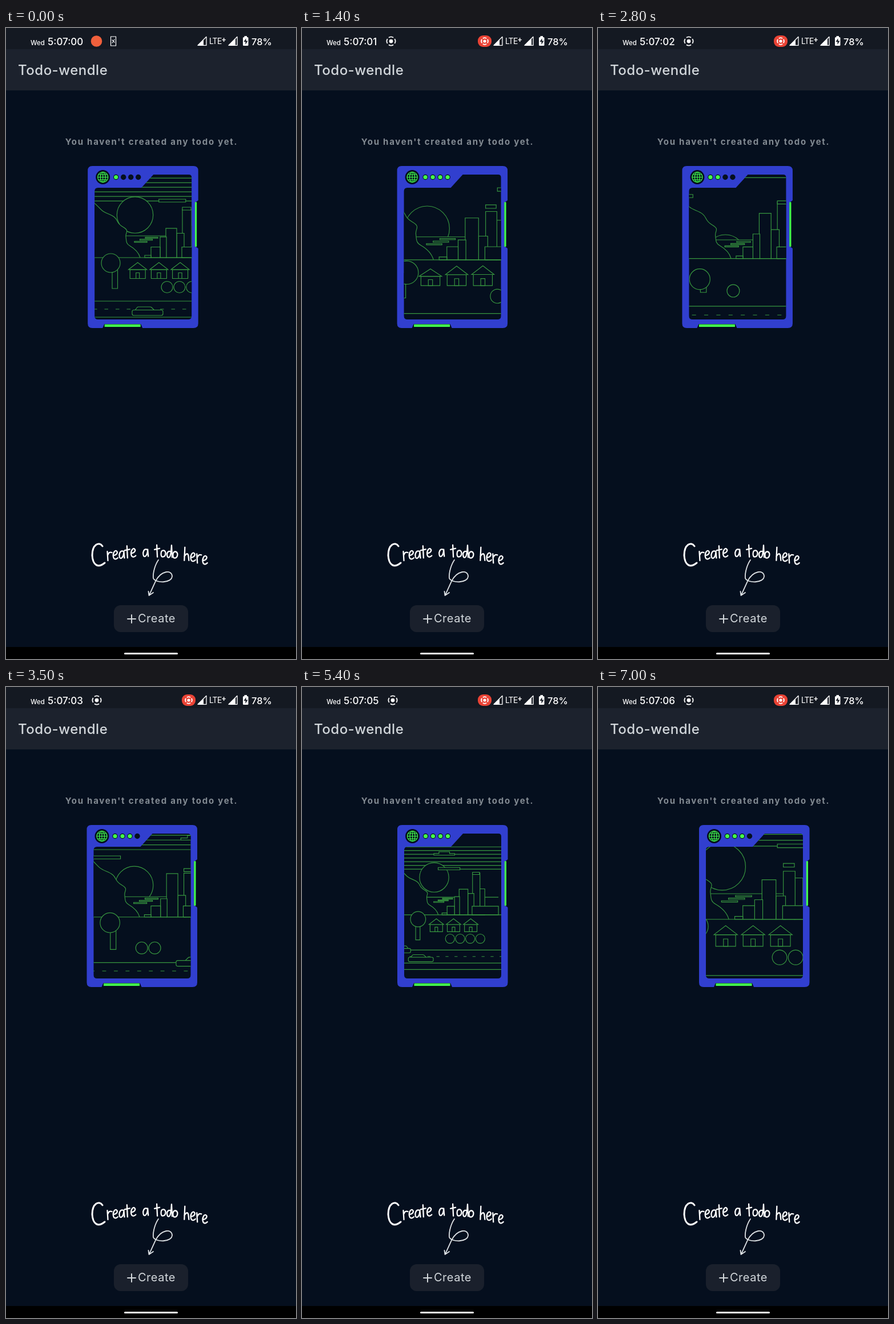
Animation of 508x1102 px, one loop 7100 ms. Source, as an HTML page with a canvas:

```html
<!DOCTYPE html>
<html lang="en">
<head>
<meta charset="utf-8">
<title>Todo list, empty state</title>
<style>
html, body { margin: 0; width: 100%; height: 100%; overflow: hidden; background: #050f1e; }
canvas { display: block; width: 100%; height: 100%; }
</style>
</head>
<body>
<canvas id="stage" width="508" height="1102" aria-label="Create a todo here"></canvas>
<script>
const ctx = document.getElementById('stage').getContext('2d');
const LOOP = 7100, CYCLE = 6200;
const NIGHT = '#050f1e', BLUE = '#313fcf', LIME = '#43fb4d', LINE = '#37963f';

const clamp = v => Math.max(0, Math.min(1, v));
const smooth = v => { v = clamp(v); return v * v * (3 - 2 * v); };
// Cosine that peaks at the given time and swings a whole number of times per cycle.
const wave = (p, swings, peak) => Math.cos(2 * Math.PI * swings * (p - peak) / CYCLE);
// Rises at one time and falls again at another.
const pulse = (q, rise, fall, length) => smooth((q - rise) / length) - smooth((q - fall) / length);

// Monotone cubic through [time, value] points that ends on its first value.
function path(p, ...points) {
  const pts = [...points, [CYCLE, points[0][1]]];
  const slope = k => (pts[k + 1][1] - pts[k][1]) / (pts[k + 1][0] - pts[k][0]);
  const tangent = k => {
    if (k === 0 || k === pts.length - 1) return 0;
    const a = slope(k - 1), b = slope(k);
    return a * b <= 0 ? 0 : 2 * a * b / (a + b);
  };
  let i = 0;
  while (p >= pts[i + 1][0]) i++;
  const [[t0, v0], [t1, v1]] = [pts[i], pts[i + 1]];
  const u = (p - t0) / (t1 - t0);
  return v0 + (v1 - v0) * smooth(u)
    + (t1 - t0) * u * (1 - u) * ((1 - u) * tangent(i) - u * tangent(i + 1));
}

function rect(x, y, w, h, color, r = 0) {
  ctx.fillStyle = color;
  ctx.beginPath();
  ctx.roundRect(x, y, w, h, r);
  ctx.fill();
}
function disc(x, y, r, color) {
  ctx.fillStyle = color;
  ctx.beginPath();
  ctx.arc(x, y, r, 0, 7);
  ctx.fill();
}
function label(str, x, y, font, color, align = 'left', spacing = 0) {
  ctx.font = font + ', sans-serif';
  ctx.fillStyle = color;
  ctx.textAlign = align;
  ctx.letterSpacing = spacing + 'px';
  ctx.fillText(str, x, y);
}
function stroke(d, color, width, x = 0, y = 0) {
  ctx.save();
  ctx.translate(x, y);
  ctx.strokeStyle = color;
  ctx.lineWidth = width;
  ctx.lineCap = ctx.lineJoin = 'round';
  ctx.stroke(new Path2D(d));
  ctx.restore();
}
function fill(d, color) {
  ctx.fillStyle = color;
  ctx.fill(new Path2D(d));
}

function targetIcon(x, y, r) {
  disc(x, y, r * .45, '#fff');
  ctx.strokeStyle = '#fff';
  ctx.lineWidth = 1.8;
  for (let i = 0; i < 4; i++) {
    const a = i * Math.PI / 2;
    ctx.beginPath();
    ctx.arc(x, y, r, a - .58, a + .58);
    ctx.stroke();
  }
}

function statusBar(t) {
  rect(0, 0, 508, 37, '#141922');
  const second = Math.max(0, Math.floor((t - 300) / 1000));
  label('Wed', 43, 30, '500 11.5px Inter', '#fff');
  label('5:07:0' + second, 73, 30, '500 17px Inter', '#fff');
  if (t < 400) {
    disc(158.5, 23, 9.8, '#f0603c');
    stroke('M183.5 15h9v16h-9zM186 21l4 4M190 20l-4 6', '#fff', 1.2);
  } else {
    targetIcon(second === 1 ? 156 : 159, 23, 7.5);
    rect(308, 13, 24, 20, '#ea4335', 9);
    targetIcon(320, 23, 5.8);
  }
  for (const [x, level] of [[336, 10], [390, 12]]) {
    stroke(`M${x} 30.3h15v-15z`, '#fff', 1.3);
    fill(`M${x} 30h${level}v-${level}z`, '#fff');
  }
  label('LTE', 356, 28, '14px Roboto', '#fff');
  label('+', 378, 25, '500 13px Roboto', '#fff');
  rect(415, 16, 9.5, 15, '#fff', 1.5);
  rect(417.5, 14, 4.5, 3, '#fff');
  fill('M420.5 18l-4 6h3v5l4-6.5h-3z', '#141922');
  label('78%', 430, 30, '500 16.5px Inter', '#fff');
}

// Pen strokes of the handwriting, standing on y = 0.
const GLYPHS = {
  r: 'M0-16L1 0M1-10Q3-16 8-14',
  e: 'M0-7Q7-8 7-13Q5-17 2-14Q-2-8 1-2Q4 1 8-3',
  a: 'M8-12Q2-16 0-7Q0 1 4-1Q8-4 8-13L9-1',
  t: 'M3-21L4 0M-1-13L8-15',
  o: 'M4-12Q0-12 0-6Q0 0 4-1Q8-2 8-8Q7-12 4-12Z',
  d: 'M8-10Q2-14 0-7Q0 1 4-1Q7-3 8-22L9-1',
  h: 'M0-23L-1 0M-1-7Q4-15 6-9L7 0'
};

function handwriting() {
  stroke('M169 905C163 896 151 902 151 921C152 938 161 944 173 934', '#fff', 3);
  [...'reate a todo here'].forEach((letter, i) => {
    const x = 177.5 + 10.45 * i;
    if (letter !== ' ') stroke(GLYPHS[letter], '#fff', 2.3, x, 923.5 + .0014 * (x - 246) ** 2);
  });
  stroke('M267 929C262 936 257 950 258 961C262 970 291 970 291 957C290 946 272 947 262 966L251 990M249.5 984L250.5 991L258 986', '#dfe3e6', 1.8);
}

function page(t) {
  rect(0, 0, 508, 1102, NIGHT);
  rect(0, 37, 508, 72, '#1c222d');
  statusBar(t);
  label('Todo-wendle', 21, 82, '500 24px Inter', '#d2d7db', 'left', .5);
  label("You haven't created any todo yet.", 255, 204, 'bold 15px Inter', '#838b93', 'center', 1.75);
  handwriting();
  rect(189, 1008, 130, 47, '#1a202c', 12);
  stroke('M213 1032h14M220 1025v14', '#d2d7db', 2);
  label('Create', 231, 1038, '20px Inter', '#d2d7db', 'left', .5);
  rect(0, 1081, 508, 21, '#000');
  rect(207, 1091, 94, 3, '#fff', 1.5);
}

// Outlined shape that hides what lies behind it.
function shape(d) {
  const outline = new Path2D(d);
  ctx.fill(outline);
  ctx.stroke(outline);
}
const box = (x, y, w, h) => shape(`M${x} ${y}h${w}v${h}h${-w}z`);
const line = (x1, y1, x2, y2) => ctx.stroke(new Path2D(`M${x1} ${y1}L${x2} ${y2}`));
function circle(x, y, r) {
  ctx.beginPath();
  ctx.arc(x, y, r, 0, 7);
  ctx.fill();
  ctx.stroke();
}

const RIDGE = 'M-180-110L-113-85C-100-82-94-72-87-66S-72-60-65-54S-62-44-50-37S-46-28-45-20S-45-8-38-4S-23 6-20 16.5';

function sky(p, q) {
  const lowest = path(p, [0, -82.6], [1100, -125], [2700, -96], [3700, -72.5], [4600, -82]);
  for (let i = 0; i < 7; i++) line(-200, lowest - 8 * i, 200, lowest - 8 * i);

  const water = -21.5 + path(p, [0, 3.3], [1500, 9.5], [3700, 0], [5400, 0]);
  ctx.save();
  ctx.beginPath();
  ctx.rect(-200, -200, 400, 200 + water);
  ctx.clip();
  circle(-29, path(p, [0, -54.7], [1100, 4.7], [1600, 25], [2700, -36.5], [3700, -68]), 31.7);
  ctx.restore();
  line(-47, water, 110, water);
  for (let i = 0; i < 3; i++) box(-11 - 9.5 * i, water + 2.3 + 3.6 * i, 22, 1.8);

  ctx.fill(new Path2D(RIDGE + 'L-200 16V-130z'));
  ctx.stroke(new Path2D(RIDGE));

  const drift = .0414 * (q - 2700);
  box(drift - 99, -85.5, 47, 5);
  shape(`M${49 - drift}-115.5h11v-4h23v4h11v3.5h-45z`);
}

function city(p) {
  const ground = 16.5, beat = wave(p, 2, 1750);
  const building = (x, w, h) => box(x, ground - h, w, h);
  const tower = 78 + 14 * beat;
  building(69, 11.5, 56);
  building(54, 16, tower);
  box(54, ground - tower - 6 + 5 * beat, 15, 5);
  building(44, 13, 39 + 8 * beat);
  building(25, 19, 62 + 11 * wave(p, 1, 2400));
  building(15, 11, 33 + 7 * beat);
  building(-1, 16, 18.5);
  building(-12, 11, 4);
  building(53, 57, 18.5);
  line(-200, ground, 200, ground);
}

function street(p, q) {
  const crown = 26 + path(p, [0, 0], [1700, 30], [2700, 0]);
  box(-69, crown, 9.5, 70.5 - crown);
  circle(-64.5 + 7 * wave(p, 2, 775), crown, 16.5);

  for (let i = 0; i < 3; i++) {
    const x = -24.3 + 37.2 * i, grow = pulse(q, 3150 + 130 * i, 6650 + 110 * i, 600);
    if (grow < .02) continue;
    const y = v => 53 - v * grow;
    box(x - 13.5, y(15.7), 27, 15.7 * grow);
    shape(`M${x - 16} ${y(15.7)}L${x} ${y(28)}L${x + 16} ${y(15.7)}z`);
    box(x - 3, y(10), 6, 10 * grow);
  }
  for (let i = 0; i < 5; i++) {
    const grow = pulse(q, 1650 + 650 * i, 4250 + 650 * i, 300);
    if (grow > .01) circle(-16.5 + 21.8 * i, 68, 10 * grow);
  }

  for (const y of [92.5, 120.5, 134.5]) line(-200, y, 200, y);
  for (let x = -141; x < 120; x += 19.5) line(x, 106.5, x + 6.5, 106.5);
  car(41 - .092 * (q - 2700), 83.5, 1);
  car(-142 + .0635 * (q - 3700), 102.5, -1);
}

function car(x, y, facing) {
  ctx.save();
  ctx.translate(x + 27, y);
  ctx.scale(facing, 1);
  shape('M-12 6L-7 1Q-6 0-4 0H16Q18 0 19 2L22 6z');
  ctx.beginPath();
  ctx.roundRect(-27, 5.5, 54, 9.5, 3);
  ctx.fill();
  ctx.stroke();
  ctx.restore();
}

const SCREEN = 'M12 44Q12 38 18 38H94L115 15H177Q182 15 182 20V262Q182 268 176 268H18Q12 268 12 262z';
const CASE = 'M8 0H185Q193.5 0 193.5 8V60L188 64V140L193.5 144V275Q193.5 283 185 283H96L93 276H29L26 283H8Q0 283 0 275V8Q0 0 8 0z';

function phone(p) {
  // q runs on past the cycle's end, so that nothing wraps while in view.
  const q = p < 1300 ? p + CYCLE : p;
  const left = path(p, [0, 177], [1100, 155.5], [2700, 141.5], [3500, 131], [4600, 167], [5300, 142]);
  const zoom = path(p, [0, 1.29], [1100, 1.167], [3700, .96], [4600, .81], [5400, 1]);
  ctx.save();
  ctx.translate(left, 241);
  fill(CASE, BLUE);
  rect(187.8, 63, 3.2, 78, LIME, 1);
  rect(29.5, 276.5, 63, 4.5, LIME);

  ctx.save();
  const glass = new Path2D(SCREEN);
  ctx.fillStyle = NIGHT;
  ctx.fill(glass);
  ctx.clip(glass);
  // The scene stays put behind the moving window.
  ctx.translate(255 - left, 143.5);
  ctx.scale(zoom, zoom);
  ctx.strokeStyle = LINE;
  ctx.lineWidth = 1.15 / zoom;
  sky(p, q);
  city(p);
  street(p, q);
  ctx.restore();

  disc(26.5, 19.5, 12.5, NIGHT);
  ctx.strokeStyle = LIME;
  ctx.lineWidth = 1.2;
  for (const rx of [9, 4.5]) {
    ctx.beginPath();
    ctx.ellipse(26.5, 19.5, rx, 9, 0, 0, 7);
    ctx.stroke();
  }
  stroke('M17.5 19.5h18M26.5 10.5v18M19 15h15M19 24h15', LIME, 1.1);

  const lit = Math.floor(3.3 + p / 525 + 2.45 * clamp((p - 3700) / 900)) % 5;
  for (let i = 0; i < 4; i++) {
    disc(49.5 + 13 * i, 19.5, 4.7, NIGHT);
    if (i < lit) disc(49.5 + 13 * i, 19.5, 3.6, LIME);
  }
  ctx.restore();
}

function frame(now) {
  const t = Math.floor(now % LOOP / 100) * 100;
  page(t);
  phone((t - 800 + CYCLE) % CYCLE);
  requestAnimationFrame(frame);
}
requestAnimationFrame(frame);
</script>
</body>
</html>
```
